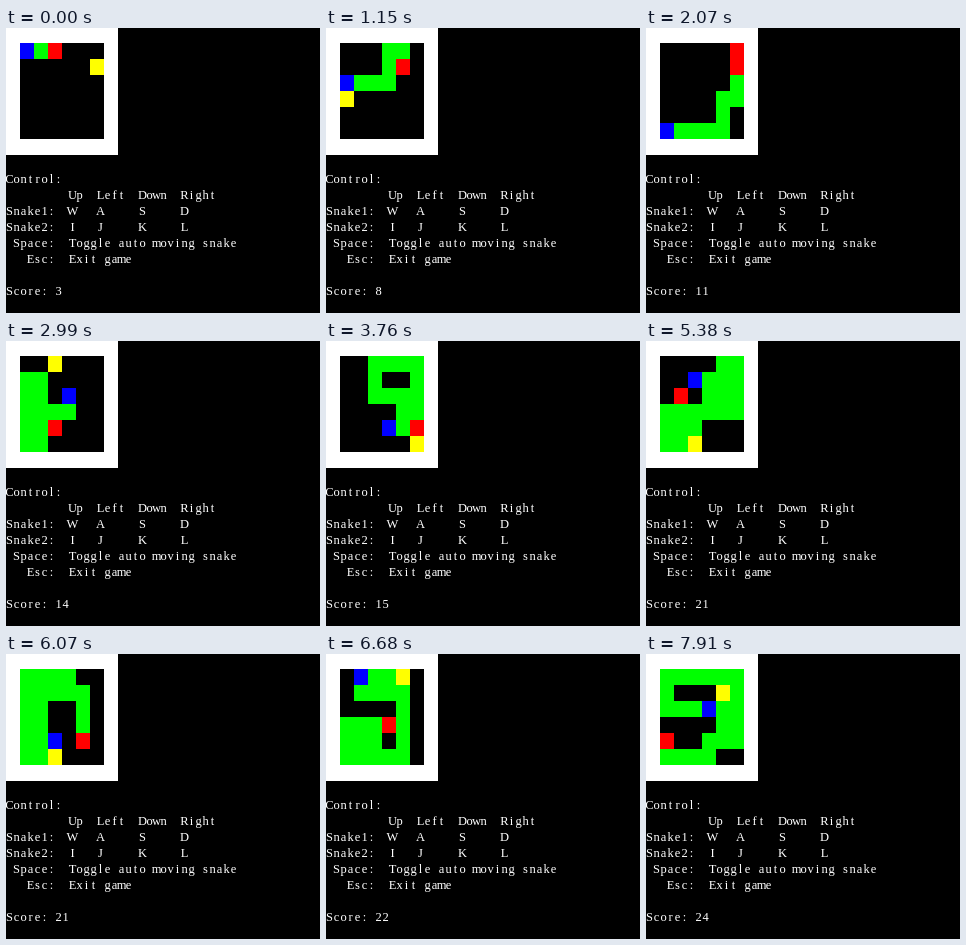
Animation of 314 by 285 pixels, one loop 7.99 s. Source, as an HTML page:

```html
<!DOCTYPE html>
<html lang="en">
<head>
<meta charset="utf-8">
<title>Console snake</title>
<style>
  html, body { margin: 0; width: 100%; height: 100%; overflow: hidden; background: #000; }
  svg { display: block; }
  text {
    font: 12.5px "Liberation Serif", "Noto Serif", serif;
    font-kerning: none;
    font-variant-ligatures: none;
    text-anchor: middle;
    fill: #fff;
    white-space: pre;
  }
</style>
</head>
<body>
<svg id="stage" width="314" height="285" viewBox="0 0 314 285">
  <rect width="314" height="285" fill="#000"/>
  <rect width="112" height="127" fill="#fff"/>
  <rect x="14" y="15" width="84" height="96" fill="#000"/>
</svg>
<script>
const LOOP = 7990, STEP = 76.85, LAST_STEP = 103;
const CELL_W = 14, CELL_H = 16, SIZE = 6, START_LEN = 3;
const CHAR_W = 7, LINE_H = 16, FIRST_LINE = 155;
const COLORS = { empty: '#000', body: '#0f0', head: '#f00', tail: '#00f', food: '#ff0' };

// Moves of the head, one letter per game tick; the first two lay out the starting snake.
const MOVES = [
  'RR', 'RRRD', 'DDLLLDLDLUUU', 'RRRUURD',
  'DDLLLL', 'DDRRRR', 'UURUUU', 'LDDL', 'DLLUULDDDDRUR',
  'RRUULLUU', 'RRRDDDDD', 'LLLLLUUUURRRR',
  'URDDDLULDLDLDLUURU', 'LUURDRURDRDDDDLL', 'ULDLUURRR',
  'ULLLUURRRRRDDLDRDLLDLLLU'
].join('');
const MEALS = [4, 7, 11, 13, 22, 29, 35, 41, 46, 51, 55, 66, 74, 87, 90, 94, 96, 98, 121, 140, 147];
const LAST_FOOD = 4 + 1 * SIZE;

const delta = { R: 1, L: -1, D: SIZE, U: -SIZE };
const trail = [0];
for (const m of MOVES) trail.push(trail[trail.length - 1] + delta[m]);

const stage = document.getElementById('stage');

function add(tag, attrs, text = '') {
  const el = document.createElementNS(stage.namespaceURI, tag);
  for (const key in attrs) el.setAttribute(key, attrs[key]);
  el.textContent = text;
  stage.append(el);
  return el;
}

// Console text: every character is centred in its own column.
function print(col, row, text) {
  const x = Array.from(text, (_, i) => (col + i + 0.5) * CHAR_W).join(' ');
  return add('text', { x, y: FIRST_LINE + row * LINE_H }, text);
}

const cells = Array.from({ length: SIZE * SIZE }, (_, i) => add('rect', {
  x: 14 + (i % SIZE) * CELL_W,
  y: 15 + Math.floor(i / SIZE) * CELL_H,
  width: CELL_W, height: CELL_H, 'shape-rendering': 'crispEdges'
}));

print(0, 0, 'Control:');
[['', 'Up', 'Left', 'Down', 'Right'],
 ['Snake1:', 'W', 'A', 'S', 'D'],
 ['Snake2:', 'I', 'J', 'K', 'L']].forEach((line, r) =>
  line.forEach((word, c) => word && print([0, 9, 13, 19, 25][c], r + 1, word)));
print(1, 4, 'Space:');
print(9, 4, 'Toggle auto moving snake');
print(3, 5, 'Esc:');
print(9, 5, 'Exit game');
const score = print(0, 7, 'Score: 00');

function draw(tick) {
  const eaten = MEALS.filter(t => t <= tick).length;
  const length = START_LEN + eaten;
  const body = trail.slice(tick + START_LEN - length, tick + START_LEN);
  const eating = MEALS.includes(tick);
  const look = Array(SIZE * SIZE).fill('empty');

  // The next food shows up one tick after a meal, when the old head is repainted too.
  if (!eating) look[eaten < MEALS.length ? trail[MEALS[eaten] + 2] : LAST_FOOD] = 'food';
  for (const c of body) look[c] = 'body';
  if (eating) look[body[length - 2]] = 'head';
  look[body[0]] = 'tail';
  look[body[length - 1]] = 'head';

  cells.forEach((cell, i) => cell.setAttribute('fill', COLORS[look[i]]));
  score.textContent = 'Score: ' + length;
}

function render(ms) {
  const step = Math.min(LAST_STEP, Math.floor((ms % LOOP + 10) / STEP));
  draw(Math.floor(step * 1.49 + 0.8));
}

const begin = performance.now();
function loop() {
  render(performance.now() - begin);
  requestAnimationFrame(loop);
}
loop();
</script>
</body>
</html>
```
